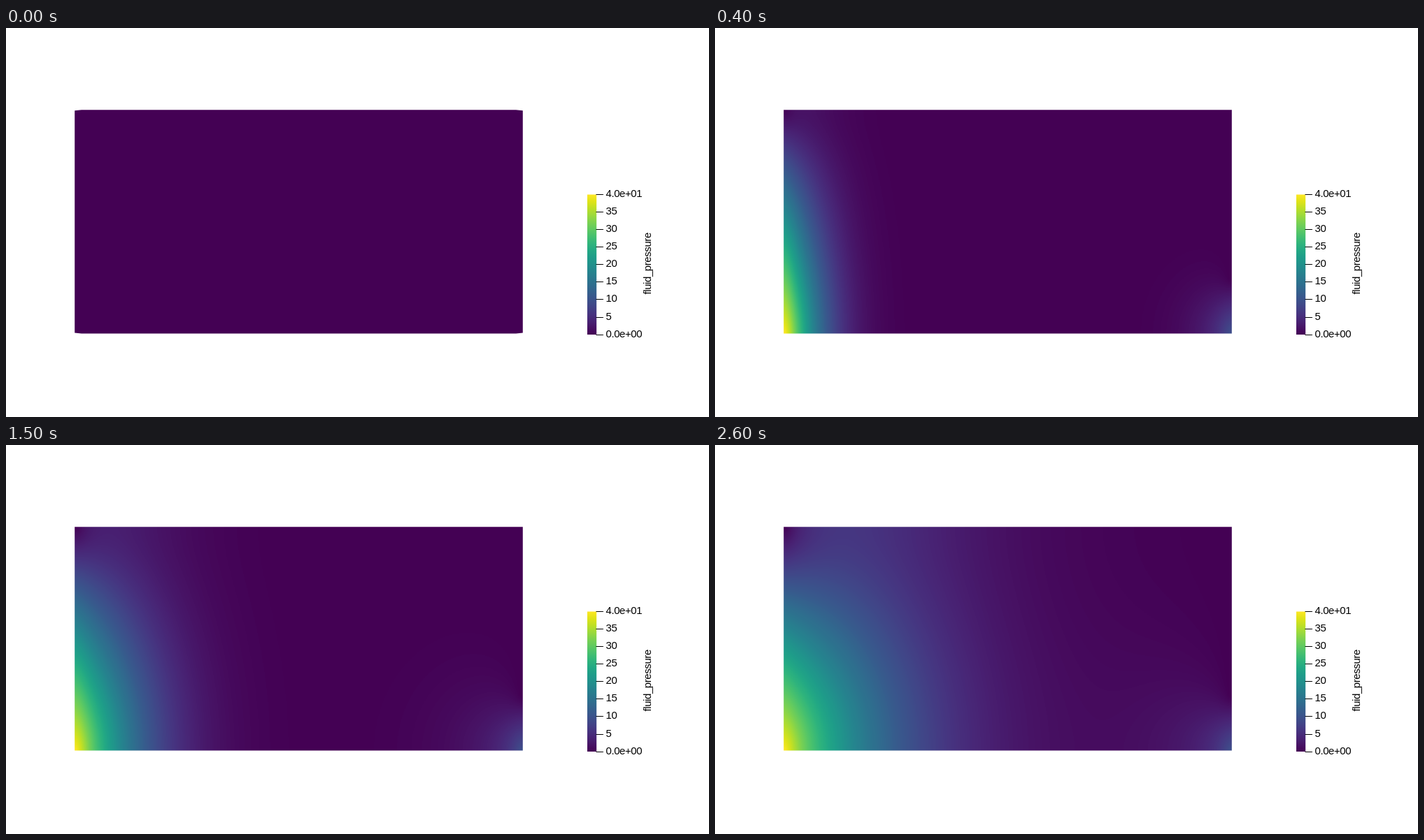
An HTML page with a canvas for the animation above (7700 ms loop, 1005 by 557 pixels).

```html
<!DOCTYPE html>
<html lang="en">
<head>
<meta charset="utf-8">
<title>Fluid pressure</title>
<style>
  html, body { margin: 0; width: 100%; height: 100%; overflow: hidden; background: #fff; }
  canvas, svg { position: absolute; display: block; }
  #field { left: 98px; top: 117px; clip-path: inset(0.2px 0.2px 0.5px 0.2px); }
  #field.rest {
    clip-path: polygon(0.2px 1.2px, 10px 0.2px, 631px 0.2px, 640.8px 1.2px,
      640.8px 319.5px, 631px 320.5px, 10px 320.5px, 0.2px 319.5px);
  }
  #legend { left: 0; top: 0; }
  text { font: 15px "Liberation Sans", Arial, sans-serif; letter-spacing: -0.42px; fill: #000; }
</style>
</head>
<body>
<canvas id="field" width="641" height="321"></canvas>
<svg id="legend" width="1005" height="557">
  <defs><linearGradient id="ramp" x1="0" y1="1" x2="0" y2="0"></linearGradient></defs>
  <rect x="831" y="238.5" width="13.2" height="200.5" fill="url(#ramp)"/>
  <g id="ticks"></g>
  <text transform="translate(921.5 381.5) rotate(-90)">fluid_pressure</text>
</svg>
<script>
const W = 641, H = 321, PMAX = 40, MODES = 60, LOOP = 7700;
const SLOPE = PMAX / H; // hydrostatic gradient per pixel

// [start in ms, diffusion length 2*sqrt(D*t) in pixels]
const STATES = [
  [0, 0], [100, 38], [200, 58], [300, 74], [400, 86], [600, 102],
  [800, 115], [1100, 131], [1500, 154], [2100, 194], [2300, 233], [2600, 281]
];

const VIRIDIS = ("440154 471365 482475 463480 414487 3b528b 355f8d 2f6c8e 2a788e 25848e 21918c " +
  "1e9c89 22a884 2fb47c 44bf70 5ec962 7ad151 9bd93c bddf26 dfe318 fde725").split(" ");
const rgb = VIRIDIS.map(h => [0, 2, 4].map(i => parseInt(h.slice(i, i + 2), 16)));

const palette = Array.from({ length: 256 }, (_, i) => {
  const u = i / 255 * (rgb.length - 1);
  const j = Math.min(Math.floor(u), rgb.length - 2);
  return rgb[j].map((c, n) => Math.round(c + (rgb[j + 1][n] - c) * (u - j)));
});

// erfc(z) * exp(z*z) for z >= 0
function scaledErfc(z) {
  const t = 1 / (1 + 0.3275911 * z);
  return t * (0.254829592 + t * (-0.284496736 + t * (1.421413741 + t * (-1.453152027 + t * 1.061405429))));
}

function erfc(z) {
  const e = scaledErfc(Math.abs(z)) * Math.exp(-z * z);
  return z < 0 ? 2 - e : e;
}

// Transient profile of one vertical mode, held at 1 where x = 0
function profile(x, k, len) {
  const a = x / len, b = k * len / 2;
  return 0.5 * (Math.exp(-k * x) * erfc(a - b) + Math.exp(-a * a - b * b) * scaledErfc(a + b));
}

// Cells touching a wall stay close to the wall's value
const wallDistance = x => x * (1 - Math.exp(-x / 9));

// Cosine coefficient of a water column of the given depth
function coefficient(n, depth) {
  if (n === 0) return SLOPE * depth * depth / (2 * H);
  const k = n * Math.PI / H;
  return 2 * SLOPE / H * (1 - Math.cos(k * depth)) / (k * k);
}

function pressure(len) {
  const p = new Float32Array(W * H);
  if (!len) return p;
  const row = new Float32Array(W);
  for (let n = 0; n < MODES; n++) {
    const k = n * Math.PI / H;
    const left = coefficient(n, H), right = coefficient(n, 77);
    const f = x => profile(wallDistance(x), k, len) - profile(2 * W - x, k, len);
    for (let x = 0; x < W; x++) row[x] = left * f(x + 0.5) + right * f(W - x - 0.5);
    for (let y = 0; y < H; y++) {
      const c = Math.cos(k * (H - y - 0.5)), o = y * W;
      for (let x = 0; x < W; x++) p[o + x] += c * row[x];
    }
  }
  return p;
}

const field = document.getElementById("field");
const ctx = field.getContext("2d");

function render(len) {
  const image = ctx.createImageData(W, H);
  pressure(len).forEach((v, i) => {
    const level = Math.max(0, Math.min(255, Math.floor(v / PMAX * 256)));
    image.data.set(palette[level], i * 4);
    image.data[i * 4 + 3] = 255;
  });
  return image;
}

function buildLegend() {
  document.getElementById("ramp").innerHTML = VIRIDIS.map((c, i) =>
    `<stop offset="${i / (VIRIDIS.length - 1)}" stop-color="#${c}"/>`).join("");
  let marks = "";
  for (let i = 0; i <= 8; i++) {
    const y = Math.round(438.6 - i * 25.1);
    const label = i === 0 ? "0.0e+00" : i === 8 ? "4.0e+01" : i * 5;
    marks += `<rect x="843.5" y="${y}" width="10.5" height="1"/><text x="857.5" y="${y + 4}">${label}</text>`;
  }
  document.getElementById("ticks").innerHTML = marks;
}

buildLegend();
const images = STATES.map(s => render(s[1]));
const start = performance.now();
let shown = -1;

function draw() {
  const t = (performance.now() - start) % LOOP;
  const current = STATES.filter(s => s[0] <= t).length - 1;
  if (current !== shown) {
    shown = current;
    ctx.putImageData(images[current], 0, 0);
    field.classList.toggle("rest", current === 0);
  }
  requestAnimationFrame(draw);
}
draw();
</script>
</body>
</html>
```
